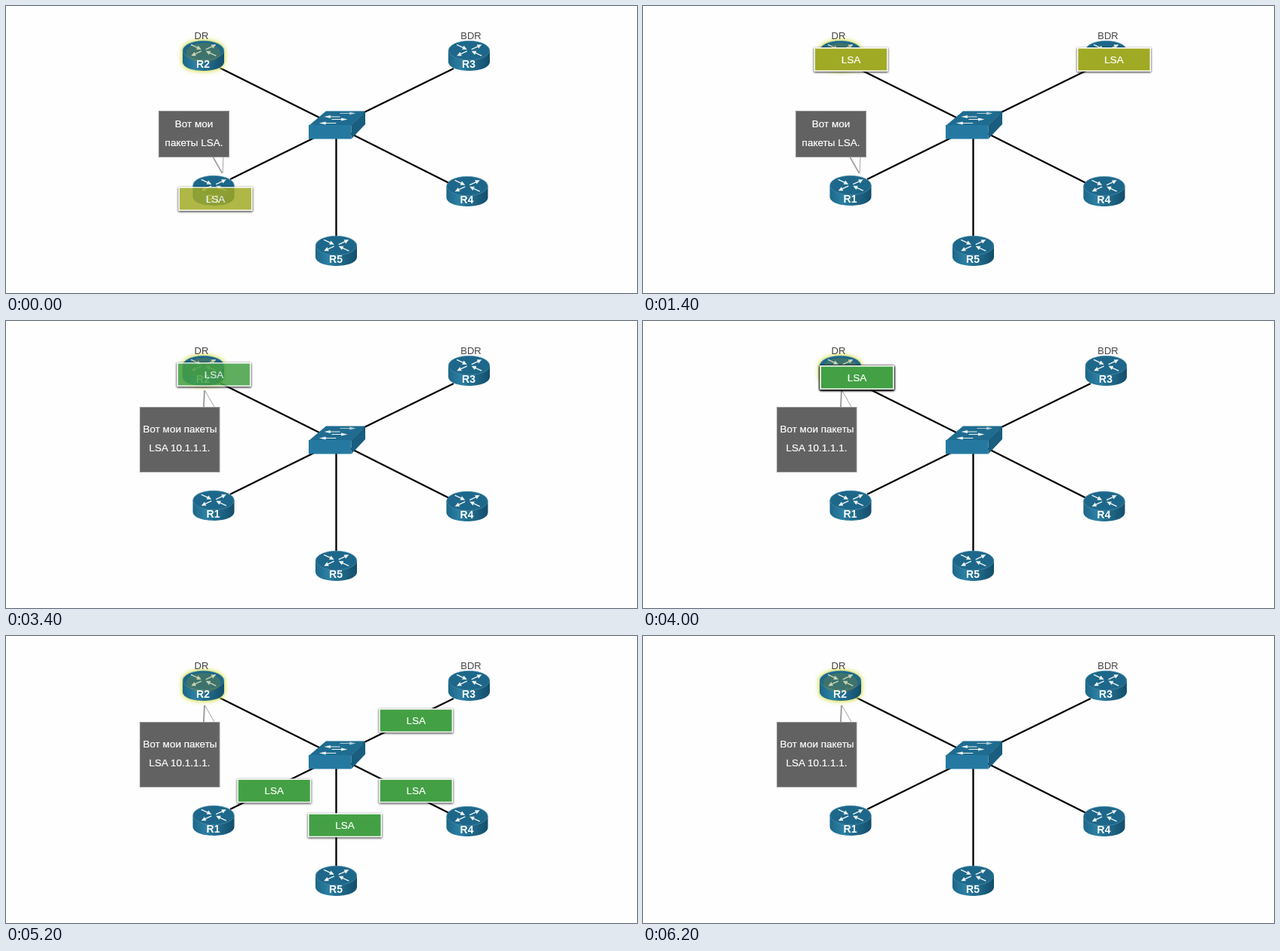
Animation, 836 px wide and 381 px high, one loop 7600 ms. Source, as an HTML page:

```html
<!DOCTYPE html>
<html lang="ru">
<head>
<meta charset="utf-8">
<title>LSA</title>
<style>
  html, body { margin: 0; width: 100%; height: 100%; overflow: hidden; background: #fefefe; }
  svg { display: block; }
  text { font-family: "Liberation Sans", sans-serif; font-size: 13.5px; text-anchor: middle;
    fill: #fff; stroke: #fff; stroke-width: .2px; }
  .role { font-size: 13px; fill: #444; stroke: none; }
  .name { font-size: 14px; font-weight: bold; stroke: none; }
  .glow { filter: drop-shadow(0 0 2px #dce25a) drop-shadow(0 0 3px #dbe36a); }
  .packet { filter: drop-shadow(0 1.5px 1.4px rgba(0, 0, 0, .85)); }
  .bubble rect { fill: #626262; stroke: #999; }
  .tail { fill: #fff; stroke: #a4a4a4; filter: drop-shadow(-.5px .5px .6px rgba(0, 0, 0, .4)); }
</style>
</head>
<body>
<svg id="stage" width="836" height="381" viewBox="0 0 836 381">
  <defs>
    <linearGradient id="side">
      <stop offset="0" stop-color="#1c6788"/>
      <stop offset=".3" stop-color="#2c7fa3"/>
      <stop offset="1" stop-color="#134e6b"/>
    </linearGradient>
    <path id="arrow" d="M-7.5-.7H1.5V-2.8L7.5 0L1.5 2.8V.7H-7.5Z" fill="#edf3f2"/>
    <g id="router">
      <path d="M-27.5-7V8C-27.5 24 27.5 24 27.5 8V-7Z" fill="url(#side)"/>
      <ellipse cy="-7" rx="27.2" ry="12.7" fill="#1d678a" stroke="#4f8fab" stroke-width=".7"/>
      <use href="#arrow" transform="translate(-9.5 -11.5) rotate(25)"/>
      <use href="#arrow" transform="translate(10 -11.5) rotate(-25)"/>
      <use href="#arrow" transform="translate(-9.5 -3) rotate(155)"/>
      <use href="#arrow" transform="translate(10 -3) rotate(205)"/>
    </g>
  </defs>

  <path d="M283 82L433 157M593 83L440 158M297 230L433 162.7M587 235L440 161M437.5 306V170"
        stroke="#000" stroke-width="2.3"/>

  <g id="switch">
    <path d="M424 139.5H476L457.5 159H401Z" fill="#1f6c90"/>
    <path d="M401 158H457.5V176.5H401Z" fill="#2579a1"/>
    <path d="M457.5 158.5L476 139.5V157L457.5 176.5Z" fill="#195d7f"/>
    <use href="#arrow" transform="translate(453 142.5) scale(1.4 .7)" opacity=".7"/>
    <use href="#arrow" transform="translate(432 147) scale(-1.4 .7)"/>
    <use href="#arrow" transform="translate(442 150.5) scale(1.4 .7)"/>
    <use href="#arrow" transform="translate(426 155.5) scale(-1.5 .7)"/>
  </g>

  <g id="routers"></g>
  <text class="role" x="259" y="43.5">DR</text>
  <text class="role" x="616" y="43.5">BDR</text>

  <g id="bubble1" class="bubble">
    <path class="tail" d="M275 201L287 222L288 201"/>
    <rect x="202.5" y="139.5" width="93" height="61"/>
    <text x="249" y="160.5">Вот мои</text>
    <text x="249" y="185.5">пакеты LSA.</text>
  </g>
  <g id="bubble2" class="bubble">
    <path class="tail" d="M262.5 114L263.5 92L276 114"/>
    <rect x="177.5" y="114.5" width="105.5" height="86"/>
    <text x="230.5" y="147.5">Вот мои пакеты</text>
    <text x="230" y="172.5">LSA 10.1.1.1.</text>
  </g>
  <g id="packets"></g>
</svg>

<script>
const LOOP = 7600;
const HUB = [449, 158];
// Moments at which the picture steps on; it rests in between.
const steps = [0, 200, 400, 600, 1000, 1200, 1400, 2000, 2200, 2400, 3400, 3600,
  4000, 4200, 4400, 4600, 5200, 5400, 5800, 6000, 6200];

const byId = id => document.getElementById(id);
const ramp = (t, a, b) => Math.min(1, Math.max(0, (t - a) / (b - a)));
const mix = (p, q, u) => p.map((v, i) => v + (q[i] - v) * u);

const routers = [[275, 245], [261.5, 66], [613.5, 66], [611, 246], [437.5, 325]];
const tint = '<ellipse cy="-4" rx="23" ry="13" fill="#7f8c2c" opacity=".32"/>';
byId('routers').innerHTML = routers.map(([x, y], i) =>
  `<g transform="translate(${x} ${y})">
    <use href="#router" class="${i === 1 ? 'glow' : ''}"/>
    ${i === 1 ? tint : ''}
    <text class="name" x="-.5" y="16.3">R${i + 1}</text>
  </g>`).join('');

const trips = [
  { color: '#a1aa24', from: [277.5, 256], ends: [[275.5, 71], [624, 71]],
    toHub: [100, 600], toEnd: [570, 1240], show: 0, faint: .6, fade: [1800, 2400] },
  { color: '#43a044', from: [275.5, 71], ends: [[271, 248], [628, 71], [628, 248], [449, 335]],
    toHub: [3970, 4620], toEnd: [5000, 5380], show: 3400, faint: .37, fade: [5600, 6200] }
];

function addPacket(color) {
  const g = document.createElementNS('http://www.w3.org/2000/svg', 'g');
  g.setAttribute('class', 'packet');
  g.innerHTML = `<rect x="-49" y="-16" width="98" height="32" fill="#fff"/>
    <rect x="-47.5" y="-14.5" width="95" height="29" fill="${color}"/>
    <text y="4.5">LSA</text>`;
  return byId('packets').appendChild(g);
}
for (const trip of trips) trip.packets = trip.ends.map(() => addPacket(trip.color));

function drawTrip(trip, t) {
  const fadeIn = t < trip.show ? 0 : t < trip.show + 200 ? trip.faint : 1;
  const alpha = fadeIn * (1 - ramp(t, ...trip.fade));
  const start = mix(trip.from, HUB, ramp(t, ...trip.toHub));
  trip.packets.forEach((packet, i) => {
    const [x, y] = mix(start, trip.ends[i], ramp(t, ...trip.toEnd));
    packet.setAttribute('transform', `translate(${x.toFixed(1)} ${y.toFixed(1)})`);
    packet.setAttribute('opacity', alpha);
    packet.style.display = alpha ? '' : 'none';
  });
}

function draw(now) {
  const time = now % LOOP;
  const t = steps.filter(s => s <= time).pop();
  byId('bubble1').style.display = t < 3400 ? '' : 'none';
  byId('bubble2').style.display = t < 3400 ? 'none' : '';
  trips.forEach(trip => drawTrip(trip, t));
}

const begin = performance.now();
(function tick() {
  draw(Math.max(0, performance.now() - begin));
  requestAnimationFrame(tick);
})();
</script>
</body>
</html>
```
